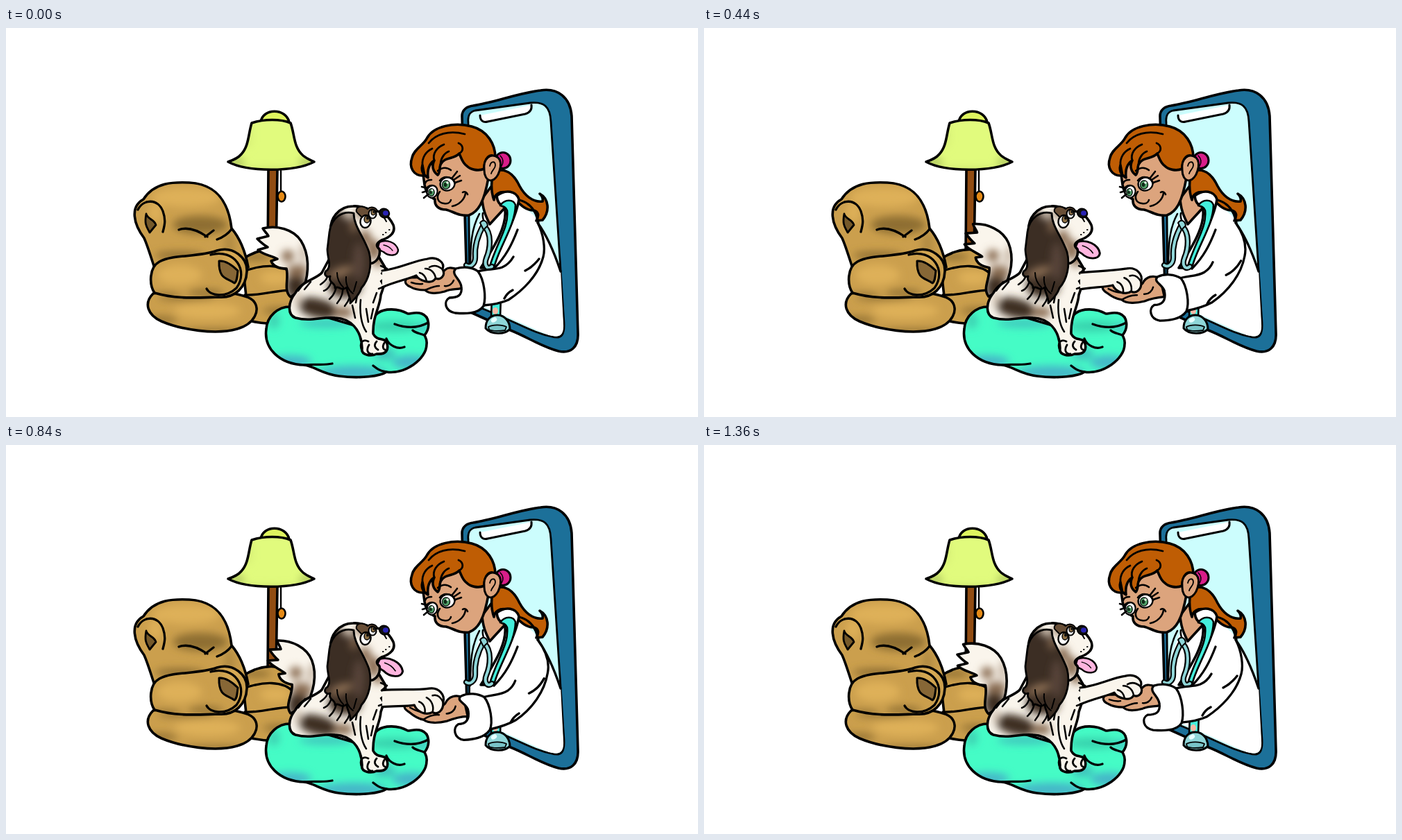
Animation, 997 px wide and 561 px high, one loop 1400 ms. Source, as an HTML page:

```html
<!DOCTYPE html>
<html lang="en">
<head>
<meta charset="utf-8">
<title>Dog and vet</title>
<style>
html, body { margin: 0; width: 100%; height: 100%; overflow: hidden; background: #fff; }
svg { display: block; width: 100vw; height: 100vh; }
.ink { fill: none; stroke: #000; stroke-linecap: round; stroke-linejoin: round; }
</style>
</head>
<body>
<svg id="stage" viewBox="0 0 997 561" xmlns="http://www.w3.org/2000/svg">
<defs>
<filter id="soft" x="-60%" y="-60%" width="220%" height="220%"><feGaussianBlur stdDeviation="6"/></filter>
</defs>
</svg>
<script>
const stage = document.getElementById('stage');
let clips = 0;

const fill = (d, color, id = '') => `<path id="${id}" d="${d}" fill="${color}"/>`;
const ink = (d, w = 3.3, id = '', color = '#000') =>
  `<path id="${id}" class="ink" d="${d}" stroke-width="${w}" style="stroke:${color}"/>`;
const oval = (x, y, rx, ry, color, w = 0, turn = 0) =>
  `<ellipse cx="${x}" cy="${y}" rx="${rx}" ry="${ry}" fill="${color}" transform="rotate(${turn} ${x} ${y})"` +
  (w ? ` stroke="#000" stroke-width="${w}"/>` : '/>');

// Filled shape with blurred shading kept inside its edge: [color, x, y, rx, ry, turn]
function shaded(d, color, shades) {
  const id = 'clip' + clips++;
  return `<clipPath id="${id}"><path d="${d}"/></clipPath>${fill(d, color)}<g clip-path="url(#${id})"><g filter="url(#soft)">` +
    shades.map(([c, x, y, rx, ry, turn]) => oval(x, y, rx, ry, c, 0, turn)).join('') + '</g></g>';
}
const shape = (d, color, shades = [], w = 3.6) =>
  (shades.length ? shaded(d, color, shades) : fill(d, color)) + ink(d, w);

const TAN = '#cb9f4d', GOLD = '#deb058', SHADE = '#8e6e33';
const CREAM = '#faf5ec', DARK = '#3c2e24', BROWN = '#8a6d53';
const SKIN = '#dca47d', HAIR = '#bf5d04', TEAL = '#44eedb', PALE = '#8fd6d8', BLUE = '#45b6c8';

function phone() {
  return shape('M657 127 C657 118 664 113 673 112 C704 107 738 94 770 90 C795 86 813 100 815 127 L824 440 C825 460 814 470 796 466 C772 460 750 445 727 436 L665 408 Z', '#1c7099') +
    shape('M666 136 C665 126 668 121 676 119 L755 108 C775 106 784 113 785 135 L804 425 C805 443 800 449 786 445 C760 440 740 426 680 402 L668 398 Z', '#ccfdfd', [], 2.8) +
    shape('M683 126 C683 133 687 137 694 135 L748 124 C755 122 758 118 757 111', '#fff', [], 3);
}

function lamp() {
  return shape('M378 204 L377 326 L389 326 L391 204 Z', '#914d13') +
    ink('M396 206 L396 236', 2.4) + oval(397, 243, 5.5, 7.5, '#e58a16', 2.6) +
    shape('M367 136 C369 115 404 115 408 136 Z', '#dff45f') +
    shape('M354 137 C372 131 396 131 410 137 C416 153 414 172 428 184 C434 189 440 191 444 193 C415 208 348 208 320 193 C326 191 334 188 339 182 C350 170 349 153 354 137 Z', '#e1fb7d',
      [['#b3cb60', 330, 194, 14, 8], ['#b3cb60', 436, 194, 14, 8], ['#c0d868', 383, 206, 50, 3], ['#cfe771', 350, 155, 3, 18]]);
}

function chair() {
  return shape('M340 334 C365 316 395 315 412 330 L425 420 C400 428 375 428 350 422 Z', TAN,
      [[SHADE, 360, 330, 22, 5], [SHADE, 395, 408, 25, 5], [GOLD, 388, 360, 22, 10]]) +
    ink('M340 352 C370 340 400 340 414 356 M344 385 C370 386 388 378 412 378') +
    shape('M214 346 C208 328 204 314 199 303 C184 283 178 258 198 247 C214 222 242 222 264 223 C300 225 320 246 325 289 C336 302 344 318 349 345 Z', TAN,
      [[SHADE, 280, 284, 40, 13], [SHADE, 250, 328, 36, 6], [GOLD, 260, 244, 50, 14], [GOLD, 215, 266, 10, 14], ['#b08a42', 322, 312, 8, 18]]) +
    ink('M190 262 C198 246 219 246 226 264 C231 278 228 286 226 294 M249 291 C262 286 278 293 290 301 M287 301 L299 292 M325 290 C320 297 312 302 304 305') +
    shape('M202 268 C204 276 214 276 216 284 L207 295 C203 287 199 284 202 268 Z', '#75592a', [], 2.8) +
    shape('M212 383 C198 397 204 414 224 423 C252 435 302 443 333 434 C358 427 368 406 356 393 C340 378 250 374 212 383 Z', TAN,
      [[SHADE, 222, 421, 26, 5], [GOLD, 290, 408, 48, 12], [SHADE, 300, 438, 50, 4], [SHADE, 260, 389, 42, 4]]) +
    shape('M214 382 C206 370 206 345 221 337 C242 326 276 331 304 321 C327 314 348 331 347 351 C346 374 330 390 306 388 C270 389 245 391 214 382 Z', TAN,
      [[GOLD, 250, 356, 32, 15], [SHADE, 288, 382, 26, 5], [SHADE, 230, 386, 22, 4], [GOLD, 326, 330, 12, 7]]) +
    ink('M295 327 C330 318 350 350 332 375 C316 390 294 386 289 376') +
    shape('M307 336 C317 335 326 342 334 350 C333 358 333 366 329 368 C320 360 306 364 307 336 Z', '#876736', [], 3);
}

function tail() {
  const d = 'M410 388 C399 378 408 362 404 347 C394 347 385 344 382 336 L391 333 C382 328 370 327 363 320 L377 316 C370 312 366 308 362 304 L378 300 C376 296 372 293 370 289 C390 284 414 290 425 307 C437 326 437 352 429 375 Z';
  return '<g id="tail">' + shape(d, CREAM,
    [[DARK, 418, 372, 15, 20], [BROWN, 406, 329, 9, 9], ['#b5a18e', 428, 325, 4, 16], [BROWN, 420, 350, 15, 9]]) + '</g>';
}

function cushion() {
  return shape('M411 402 C392 401 376 416 375 434 C371 462 394 485 430 486 C447 489 455 499 480 502 C510 506 540 502 548 496 C574 500 606 478 606 456 C607 449 604 446 603 443 C612 432 610 416 599 412 C591 409 584 412 579 412 C565 404 545 404 536 411 L512 432 Z', '#45fcc6',
    [[BLUE, 408, 481, 32, 9], [BLUE, 500, 497, 50, 10], [BLUE, 584, 482, 28, 10], ['#39d2ad', 560, 430, 38, 8],
     ['#3fc0bc', 545, 470, 16, 9], ['#43c1c4', 601, 432, 8, 7], ['#3cd0b2', 386, 422, 8, 12], ['#3fc4bd', 462, 426, 40, 6]]) +
    ink('M608 425 C592 434 574 432 560 427 M603 443 C595 440 590 440 586 436 M574 460 C564 464 552 458 548 448 M430 486 C445 484 456 487 470 484 M548 496 C539 495 534 491 529 487');
}

function dogBody() {
  const d = 'M455 353 C447 362 426 365 417 382 C405 397 406 414 417 418 C440 424 454 416 474 418 C496 419 512 434 513 462 C511 472 526 474 534 470 C547 471 553 465 548 452 C543 447 534 451 529 441 C528 416 539 402 540 385 C545 371 549 360 546 345 L530 318 L478 310 Z';
  return shape(d, CREAM,
      [[DARK, 449, 404, 31, 14, 14], [BROWN, 486, 410, 14, 8], [DARK, 488, 372, 24, 17], [BROWN, 536, 328, 10, 17], ['#d5c6b5', 420, 390, 5, 12]]) +
    ink('M513 466 C508 454 514 448 522 452 M523 457 C518 465 522 471 528 470 M534 452 C529 457 532 462 536 464 M548 451 C542 456 542 462 546 464', 2.8) +
    ink('M511 392 C509 410 512 428 519 438 M519 405 L522 424 M529 405 L526 419 M499 400 L503 418 M507 380 L504 396 M534 382 L529 396 M540 343 L549 347 L541 354 L549 359 L540 365 L545 373 L537 376', 2.5) +
    ink('M465 352 C464 361 460 365 453 370 M470 359 C469 370 464 377 458 379 M477 362 C477 375 473 385 466 391 M485 369 C487 382 483 390 477 397 M496 374 C498 386 493 395 488 401 M431 366 L421 379 M439 366 L430 377', 2.5);
}

function dogHead() {
  const d = 'M468 300 C464 273 481 257 500 257 C512 256 521 261 529 263 L543 266 C550 271 555 278 558 284 C562 295 553 302 541 306 C534 310 532 314 538 319 C540 328 535 336 528 339 L508 343 Z';
  return '<g id="tongue">' +
    shape('M538 309 C548 304 562 309 565 320 C565 329 552 330 544 323 C539 321 536 318 536 316 Z', '#ffb5df', [], 2.4) +
    ink('M544 313 C550 314 554 317 557 321', 1.3) + '</g>' +
    shape(d, CREAM, [[BROWN, 530, 320, 10, 15], [BROWN, 517, 302, 9, 11], [DARK, 478, 284, 9, 24], [BROWN, 510, 268, 7, 7]]) +
    shape('M505 265 C503 257 514 255 521 261 C525 257 533 258 535 264 C526 267 520 270 515 276 C512 271 508 269 505 265 Z', '#694f37', [], 2) +
    oval(518, 279, 7.5, 9, '#fff', 2.4, 12) + oval(520, 276, 4, 5, '#8d7046', 1.4) + oval(521, 274, 2, 2.6, '#111') +
    oval(528, 268, 5.5, 6.5, '#fff', 2.2) + oval(529, 266, 3, 3.8, '#8d7046', 1.2) + oval(530, 265, 1.6, 2, '#111') +
    oval(545, 267, 7.4, 6.4, '#101010', 2, 25) + oval(547, 267, 4, 3.4, '#2923b5') +
    ink('M545 274 L548 279 M547 295 L547.5 295 M552 291 L552.5 291 M543 298 L543.5 298', 2) +
    shape('M466 294 C469 273 485 263 501 267 C501 286 515 300 523 323 C528 342 523 363 512 375 C509 384 503 390 496 397 C497 387 491 383 491 374 C482 381 479 370 474 375 C475 367 464 368 467 358 C459 361 457 352 463 349 C469 342 463 331 463 319 Z', DARK,
      [[BROWN, 482, 352, 18, 7, -20], ['#58443a', 508, 337, 8, 28], ['#d8cabb', 494, 267, 11, 8], [BROWN, 501, 285, 5, 10]], 2.8) +
    ink('M477 353 C477 362 481 369 486 374 M490 359 C489 369 493 378 500 383 M505 366 L501 380', 2);
}

function vetBody() {
  const tubes = 'M688 284 C679 300 675 317 676 331 C676 341 668 346 663 342 M689 286 C700 296 698 318 692 332 C688 342 694 350 700 344';
  return fill('M694 256 C679 281 670 312 669 350 L669 393 L782 443 C798 447 804 443 803 427 L799 348 C790 317 777 293 760 270 L723 239 Z', '#fff') +
    ink('M766 281 C780 300 790 324 799 351') +
    shape('M686 246 C687 262 691 271 697 283 L719 259 L704 222 Z', SKIN) +
    shape('M703 207 C718 201 731 209 740 228 C747 241 759 252 773 250 C774 246 772 242 769 239 C782 246 784 264 773 277 L764 278 C768 271 768 265 760 263 C744 263 735 246 721 237 C711 235 704 240 703 248 C698 234 699 218 703 207 Z', HAIR) +
    shape('M707 242 C720 232 735 235 739 247 C736 270 718 304 700 346 L684 346 C702 318 725 282 718 258 C712 256 708 252 707 242 Z', '#fff') +
    shape('M712 256 C719 246 731 247 734 255 C734 285 710 316 703 346 L696 347 C706 311 725 288 722 263 C720 258 716 257 712 256 Z', TEAL, [], 2.6) +
    ink('M739 248 C756 252 764 265 767 281 M737 291 C729 312 720 330 703 347') +
    ink('M687 267 C686 273 688 278 690 282 M682 268 C670 290 669 314 669 347', 2.6) +
    ink(tubes, 8.4) + ink(tubes, 4, '', PALE) +
    shape('M683 281 C687 275 693 278 694 285 L688 291 Z', PALE, [], 2) +
    shape('M700 388 L699 417 L712 417 L713 388 Z', TEAL, [], 2.6) +
    oval(705, 408, 4, 5, '#f3b9a6') +
    shape('M691 433 C691 421 698 414 708 414 C719 414 726 424 726 434 C720 442 699 443 691 433 Z', PALE, [], 3) +
    shape('M695 431 C702 427 715 428 721 431 L719 436 C711 437 702 438 696 435 Z', '#79c4c8', [], 1.8) + oval(703, 421, 4.5, 3.2, '#e8ffff', 0, -30);
}

function vetHead() {
  return oval(716, 191, 11, 11.5, '#d81d89', 3) + ink('M712 184 C717 189 717 194 714 199', 1.5) +
    shape('M600 204 L603 226 C605 239 611 244 618 247 C617 256 623 262 634 262 C643 264 653 272 667 270 C681 265 689 250 695 216 L702 186 L650 168 Z', SKIN) +
    shape('M603 213 C587 214 580 201 585 187 C588 174 601 170 607 158 C616 142 646 135 671 142 C694 148 705 168 705 187 C698 179 689 187 689 203 C680 207 669 204 664 199 C657 194 656 187 653 181 C645 190 632 185 626 197 C624 203 626 208 622 212 C615 207 613 199 617 191 C608 197 607 207 608 216 C600 211 598 205 600 198 Z', HAIR) +
    ink('M653 181 C660 177 659 169 652 166 M617 191 C614 181 621 172 631 168 M600 198 C599 187 605 178 614 174 M626 197 C626 188 632 180 638 178 M661 153 C638 147 619 153 609 166', 2.8) +
    shape('M689 205 C687 188 699 179 709 187 C717 195 710 218 699 220 C692 220 689 212 689 205 Z', SKIN, [], 3) +
    ink('M697 199 C699 191 705 192 705 198 C705 203 700 205 699 210', 1.8) +
    oval(636, 225, 10.5, 9.5, '#fff', 2.3, -15) + oval(634, 226, 5.6, 6.2, '#4f9f68', 1.2) + oval(633, 226, 2.4, 3, '#102a18') + oval(636, 223, 1.7, 1.7, '#fff') +
    oval(614, 236, 7.5, 9, '#fff', 2.3, 15) + oval(613, 237, 4.2, 5.4, '#4f9f68', 1.2) + oval(612, 237, 1.9, 2.6, '#102a18') + oval(614, 234, 1.4, 1.4, '#fff') +
    ink('M625 220 C631 212 643 214 647 224 M643 216 L650 207 M645 219 L654 213 M647 223 L656 220 M607 234 C605 230 609 227 614 227 M607 231 L599 229 M607 235 L600 237 M608 240 L602 245', 2.6) +
    ink('M622 206 C629 200 636 201 641 205 M604 224 C605 220 609 219 613 219', 2.6) +
    ink('M625 236 C619 244 622 252 631 253 C636 254 640 252 641 248', 2.6) +
    ink('M643 257 C653 255 661 247 662 238 M658 237 C661 235 664 237 665 240', 2.5);
}

// Moving limbs: [resting pose, lowered pose]
const POSES = {
  hand: ['M651 349 C642 344 634 345 630 352 C620 361 601 359 583 360 C573 361 573 369 582 373 C590 378 598 378 604 378 C609 384 622 383 632 380 C643 375 649 378 657 375 Z',
    'M660 366 C649 361 638 364 633 375 C622 387 601 381 584 374 C573 371 570 380 580 386 C587 392 594 397 601 398 C609 404 624 403 636 400 C646 396 655 393 666 393 Z'],
  fingers: ['M604 378 C611 375 617 372 624 372 M632 372 C638 373 643 369 645 364 M584 367 C590 369 594 370 600 369',
    'M601 398 C608 393 615 390 624 391 M635 389 C642 389 647 384 648 378 M582 380 C589 384 595 387 602 387'],
  arm: ['M542 350 C568 347 586 336 607 333 C621 329 633 338 629 348 C634 357 626 364 619 361 C613 371 595 364 591 357 C580 362 560 366 542 374',
    'M542 354 C568 352 590 356 610 353 C624 351 633 363 630 374 C630 387 620 392 614 388 C603 393 591 386 588 377 C577 379 560 377 542 378'],
  toes: ['M629 348 C623 343 617 341 610 345 M619 361 C618 353 612 347 604 347 M606 365 C605 359 601 354 596 353',
    'M630 374 C627 366 622 361 615 363 M614 388 C617 379 613 370 606 366 M603 389 C605 381 601 374 595 372'],
  sleeve: ['M680 351 C694 347 705 349 715 345 C727 334 733 313 740 291 L766 281 C775 298 777 319 774 330 C767 357 744 379 724 392 C713 397 701 399 688 400 Z',
    'M689 365 C700 361 712 363 724 355 C734 341 738 317 743 295 L766 281 C780 299 784 314 781 329 C777 355 760 380 736 397 C724 404 711 408 699 411 Z'],
  seam: ['M680 351 C694 347 705 349 715 345 C722 342 727 337 731 330 M766 281 C775 298 777 319 774 330 C767 357 744 379 724 392 C713 397 701 399 688 400 M768 333 C761 342 756 346 748 350 M718 390 C721 384 726 380 730 378',
    'M689 365 C700 361 712 363 724 355 C729 351 732 347 734 341 M766 281 C780 299 784 314 781 329 C777 355 760 380 736 397 C724 404 711 408 699 411 M776 337 C770 349 763 355 754 359 M728 401 C731 395 735 391 740 388'],
  cuff: ['M648 347 C658 344 671 344 680 351 C689 363 692 388 688 401 C680 413 660 412 647 411 C632 408 630 394 639 389 C650 389 658 386 656 373 C655 362 640 355 648 347 Z',
    'M656 364 C667 358 681 360 690 365 C699 376 703 401 698 412 C689 424 674 426 661 427 C646 424 645 409 653 404 C665 404 669 396 667 384 C666 374 648 371 656 364 Z']
};

stage.innerHTML += phone() + vetBody() + vetHead() + lamp() + chair() + tail() + cushion() + dogBody() + dogHead() +
  fill('', SKIN, 'hand') + ink('', 3.2, 'handLine') + ink('', 2.5, 'fingers') +
  fill('', CREAM, 'arm') + ink('', 3.2, 'armLine') + ink('', 2.5, 'toes') +
  fill('', '#fff', 'sleeve') + ink('', 3.3, 'seam') + fill('', '#fff', 'cuff') + ink('', 3.3, 'cuffLine');

const blend = ([a, b], k) => {
  const to = b.match(/-?[\d.]+/g);
  let i = 0;
  return a.replace(/-?[\d.]+/g, n => (+n + (to[i++] - n) * k).toFixed(2));
};

const BEATS = [0, 175, 340, 525, 690, 875, 1040, 1220, 1400];
const WAG = [0, .9, .15, .92, .08, .73, .1, 1.02, 0];
const PANT = [0, .9, .38, .97, .3, .95, .4, .97, 0];
const wave = x => (1 - Math.cos(Math.PI * x)) / 2;

function along(values, t) {
  const i = BEATS.findIndex(b => b > t) - 1;
  return values[i] + (values[i + 1] - values[i]) * wave((t - BEATS[i]) / (BEATS[i + 1] - BEATS[i]));
}

const el = id => document.getElementById(id);

function draw(now) {
  let t = Math.floor(now % 1400 / 40) * 40;
  if (t < 80) t = 0;
  const k = wave(t / 700), pant = along(PANT, t);
  for (const name in POSES) {
    const d = blend(POSES[name], k);
    el(name).setAttribute('d', d);
    const line = el(name + 'Line');
    if (line) line.setAttribute('d', d);
  }
  el('tail').setAttribute('transform', `rotate(${17 * along(WAG, t)} 415 387)`);
  el('tongue').setAttribute('transform',
    `translate(538 312) rotate(${9 * pant}) scale(${1 + .34 * pant} ${1 + .18 * pant}) translate(-538 -312)`);
  requestAnimationFrame(() => draw(performance.now() - start));
}
const start = performance.now();
draw(0);
</script>
</body>
</html>
```
